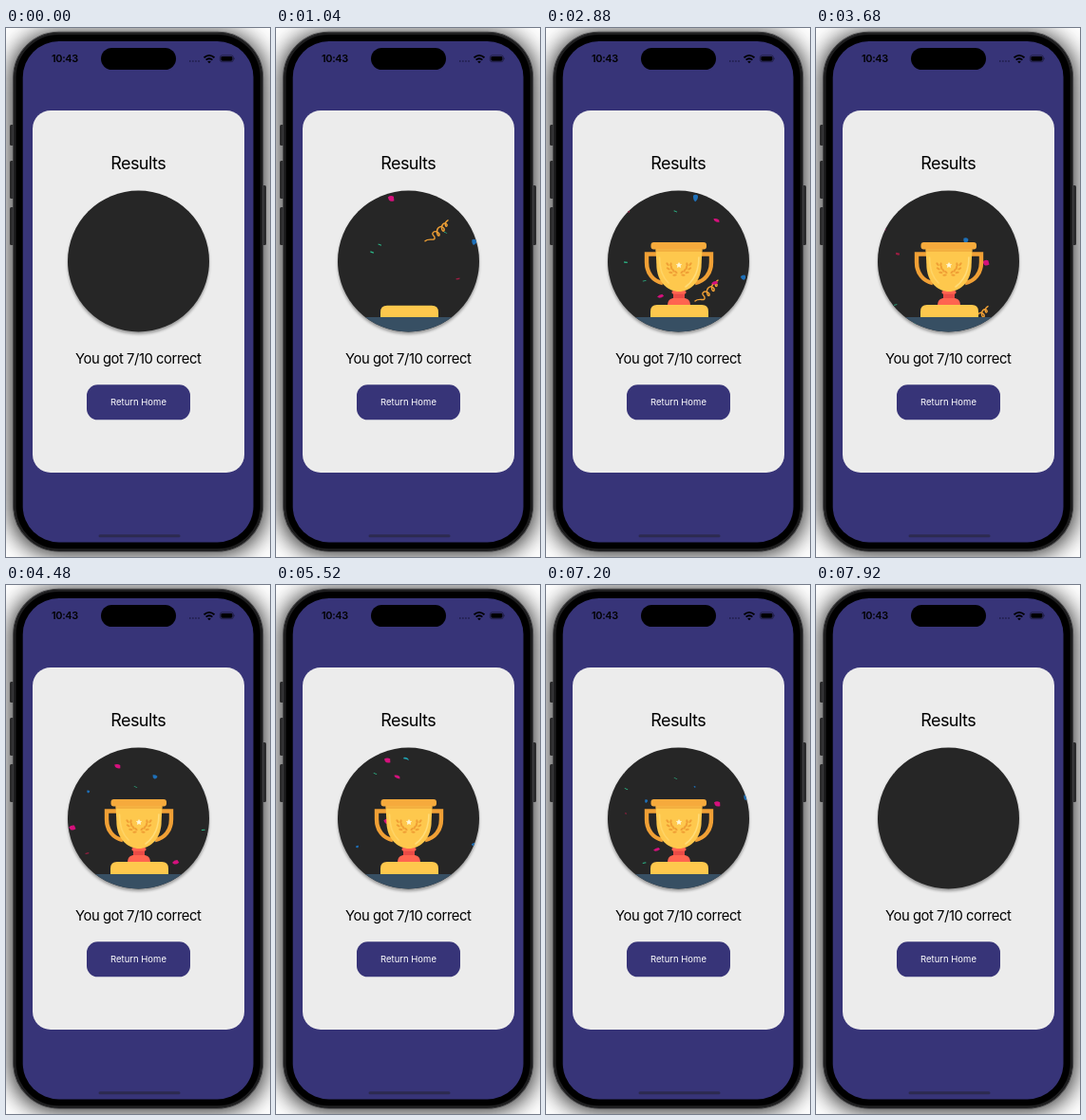
Recreate the animation shown at these times as an HTML page. Size 278 px wide and 558 px high, loop 8 s.

```html
<!DOCTYPE html>
<html lang="en">
<head>
<meta charset="utf-8">
<title>Results</title>
<style>
  html, body { margin: 0; width: 100%; height: 100%; overflow: hidden; background: #fff; }
  svg { display: block; width: 100vw; height: 100vh; }
  text { font-family: Inter, Roboto, sans-serif; letter-spacing: -.03em; text-anchor: middle; }
</style>
</head>
<body>
<svg viewBox="0 0 278 558">
  <defs>
    <filter id="halo" x="-20%" y="-20%" width="140%" height="140%"><feGaussianBlur stdDeviation="12"/></filter>
    <filter id="soft" x="-20%" y="-20%" width="140%" height="140%"><feGaussianBlur stdDeviation="1.6"/></filter>
    <clipPath id="disc"><circle cx="139.5" cy="246" r="74.5"/></clipPath>
    <clipPath id="above"><rect x="60" y="160" width="160" height="145"/></clipPath>
  </defs>

  <!-- phone -->
  <rect x="5" y="5" width="268" height="550" rx="48" opacity=".87" filter="url(#halo)"/>
  <g fill="#2b2b2c">
    <rect x="4" y="102" width="5" height="22" rx="1.5"/>
    <rect x="4" y="140" width="5" height="40" rx="1.5"/>
    <rect x="4" y="189" width="5" height="40" rx="1.5"/>
    <rect x="269" y="166" width="5" height="63" rx="1.5"/>
  </g>
  <rect x="7.8" y="4.3" width="262.700" height="547.700" rx="48" fill="#000" stroke="#434345" stroke-width="1.2"/>
  <rect x="9.5" y="6" width="259.300" height="544.300" rx="46.300" fill="none" stroke="#1f1f20" stroke-width="2"/>
  <rect x="17.700" y="14" width="242.800" height="528.500" rx="38" fill="#373478"/>
  <rect x="100" y="21" width="79" height="23" rx="11.5"/>
  <text x="62" y="36" font-size="10.9" font-weight="600">10:43</text>
  <path d="M193 35h11" stroke="#1d1b45" stroke-width="1.5" stroke-dasharray="1.5 1.6"/>
  <path d="M208.5 31.2q5.5-4.6 11 0M210.6 33.6q3.4-2.8 6.8 0" fill="none" stroke="#000" stroke-width="1.8"/>
  <path d="M212.2 35.4q1.8-1.4 3.6 0l-1.8 1.8z"/>
  <rect x="225.4" y="28.9" width="14" height="6.8" rx="2.2" fill="none" stroke="#1b1a38" stroke-width=".8"/>
  <rect x="226.4" y="29.9" width="12" height="4.8" rx="1.4"/>
  <path d="M240.3 31v2.6q1.5-1.3 0-2.6" fill="#1b1a38"/>
  <rect x="97.5" y="534.3" width="86" height="3" rx="1.5" fill="#2c2a50"/>

  <!-- card -->
  <rect x="28" y="87" width="223" height="382" rx="19" fill="#ececec"/>
  <text x="139.2" y="149" font-size="18">Results</text>
  <circle cx="139.5" cy="248.5" r="74.5" opacity=".35" filter="url(#soft)"/>
  <circle cx="139.5" cy="246" r="74.5" fill="#262626"/>
  <text x="139.2" y="354" font-size="14.8">You got 7/10 correct</text>
  <rect x="85" y="376.3" width="109" height="37" rx="11.5" fill="#373478"/>
  <text x="139.5" y="398.3" font-size="9.5" fill="#fff" style="letter-spacing:0">Return Home</text>

  <!-- celebration -->
  <g id="show" clip-path="url(#disc)">
    <g id="confetti">
      <path id="streamer" d="M-16 15C-12 11 -5 16 -6 11C-6 9 -9 9 -8 6.500C-6 3 0 6 -1 9C-3 11 -5 4 -2 1C1 -2 5 1 4 4C2 6 0 0 3 -3C5 -5 8 -3 7 -1C5 1 4 -5 8 -7"
        fill="none" stroke="#f0a035" stroke-width="1.4" stroke-linecap="round"/>
    </g>
    <g clip-path="url(#above)">
      <g id="stem">
        <path d="M134 274H146V287H134Z" fill="#e94b46"/>
        <path d="M128 293C128 287 131 285 135 285H145C149 285 152 287 152 293Z" fill="#ff6450"/>
        <rect x="132.500" y="277" width="15" height="3.500" rx="1.500" fill="#ff6450"/>
      </g>
      <g id="cup">
        <path id="handles" d="M117 238.500H106V247C106 259 113 267 123 269M163 238.500H174V247C174 259 167 267 157 269"
          fill="none" stroke="#f0a035" stroke-width="4.4"/>
        <path d="M115.5 232L116.500 253C118 269 129 278 140 278S162 269 163.500 253L164.500 232Z" fill="#fec84d"/>
        <path d="M161 242C161 258 155 267 147 273" fill="none" stroke="#ffdc78" stroke-width="1.6" stroke-linecap="round"/>
        <path d="M119.500 242C120 256 123 263 129 269" fill="none" stroke="#ffd465" stroke-width="1.6" stroke-linecap="round"/>
        <rect x="110.500" y="226" width="58.500" height="7.500" rx="3" fill="#f6aa3c"/>
        <path d="M115.500 233.500H164.500L164.300 236H115.700Z" fill="#f3b040"/>
        <g id="laurel" fill="#f0a035"></g>
        <path id="star" d="M140 247.500L140.800 249.200L142.600 249.400L141.300 250.700L141.600 252.500L140 251.600L138.400 252.500L138.700 250.700L137.400 249.400L139.200 249.200Z" fill="#fff8dc" stroke="#fff8dc" stroke-width=".6" stroke-linejoin="round"/>
      </g>
      <path id="base" d="M110 306V299Q110 292 117 292H164Q171 292 171 299V306Z" fill="#fec84d"/>
    </g>
    <rect id="floor" x="60" y="305" width="160" height="20" fill="#374f63"/>
  </g>
</svg>
<script>
const LOOP = 8, SHOW = 7.68, SPEED = 56, TOP = 172;
const $ = id => document.getElementById(id);
const make = (tag, attrs, parent) => {
  const el = document.createElementNS('http://www.w3.org/2000/svg', tag);
  for (const k in attrs) el.setAttribute(k, attrs[k]);
  return parent.appendChild(el);
};
const place = (el, transform) => el.setAttribute('transform', transform);
const ramp = (t, a, b) => Math.min(1, Math.max(0, (t - a) / (b - a)));
const out = (t, a, b) => 1 - (1 - ramp(t, a, b)) ** 3;
const zoom = (el, x, y, s) => place(el, `translate(${x} ${y}) scale(${s}) translate(${-x} ${-y})`);

for (const side of [-1, 1]) for (let i = 0; i < 4; i++) {
  const a = (22 + i * 24) * Math.PI / 180;
  for (const r of [8.5, 12]) {
    const x = 140 + side * Math.sin(a) * r, y = 250 + Math.cos(a) * r * .95;
    make('ellipse', { rx: 2.2, ry: 1.1,
      transform: `translate(${x} ${y}) rotate(${side * (-20 - i * 18 + (r > 9 ? 25 : -25))})` }, $('laurel'));
  }
}

const kinds = {
  p: ['#d5107c', 'M-3.500 -1Q-1 -4 2.500 -2.500L3.500 2Q0 4 -2 2Z'],
  b: ['#1d6fb8', 'M-2.500 -2.500Q0 -5 2.500 -3Q3.500 1 .5 4Q-2 3 -2.500 -2.500Z'],
  g: ['#2bb586', 'M-1.800 -.9L1.800 -.3V1L-1.800 .5Z'],
  c: ['#1fa5b5', 'M-3 -1Q1 -2.500 3 1.500Q0 0 -3 .6Z'],
  r: ['#a01c42', 'M-2 -1.300L2 -.6L1.500 1.500L-2 1Z']
};
// kind, x, and the second each piece passes the top of the disc
const pieces = [
  ['b', 156, 1.44], ['p', 178, 1.15], ['p', 121, .9], ['b', 208, .08], ['g', 136, 1.49],
  ['g', 104, 1.19], ['g', 178, .26], ['g', 109, .03], ['g', 101, -.11], ['r', 192, -.61], ['r', 208, .73],
  ['b', 157, 2.75], ['p', 179, 2.33], ['b', 208, 1.25], ['g', 84, 1.54], ['g', 136, 2.5],
  ['p', 117, 4.14], ['b', 156, 3.94], ['g', 136, 3.75], ['p', 70, 2.98], ['g', 208, 2.94], ['r', 86, 2.5],
  ['p', 117, 5.29], ['c', 137, 5.32], ['p', 127, 4.98], ['b', 86, 3.66, .6], ['b', 209, 3.7], ['g', 104, 5.04],
  ['g', 84, 6.43], ['g', 136, 6.63], ['b', 105, 6.2, .6], ['b', 156, 6.47, .4], ['p', 180, 6.15],
  ['b', 210, 6.27], ['r', 84, 5.97, .5]
].map(([kind, x, start, size = 1]) => {
  const [fill, d] = kinds[kind];
  return { x, start, size, el: make('path', { fill, d }, $('confetti')) };
});

function draw(t) {
  $('show').style.display = t < .7 ? 'none' : '';
  const pop = out(t, .7, .95);

  for (const p of pieces) {
    const age = t - p.start, y = TOP + SPEED * age;
    const visible = y > 160 && y < 325;
    p.el.style.display = visible ? '' : 'none';
    if (!visible) continue;
    const sway = Math.sin(age * 2.4), flip = .75 + .25 * Math.cos(age * 5);
    place(p.el, `translate(${p.x + sway * .5} ${y}) rotate(${sway * 20}) scale(${p.size * pop} ${p.size * pop * flip})`);
  }
  place($('streamer'), `translate(173 ${229 + 34.4 * (t - 1.6)}) scale(${pop})`);

  place($('floor'), `translate(0 ${16 * (1 - out(t, .7, .95))})`);
  place($('base'), `translate(0 ${14 * (1 - out(t, .85, 1.15))})`);
  place($('stem'), `translate(0 ${32 * (1 - out(t, 1, 1.35))})`);
  zoom($('cup'), 140, 278, out(t, 1.15, 1.8));
  const grip = out(t, 1.62, 2);
  $('handles').style.display = grip ? '' : 'none';
  place($('handles'), `translate(140 0) scale(${.65 + .35 * grip} 1) translate(-140 0)`);
  zoom($('laurel'), 140, 255, out(t, 1.9, 2.3));
  zoom($('star'), 140, 250, out(t, 2.1, 2.5));
}

function tick() {
  draw(performance.now() / 1000 % LOOP % SHOW);
  requestAnimationFrame(tick);
}
tick();
</script>
</body>
</html>
```
